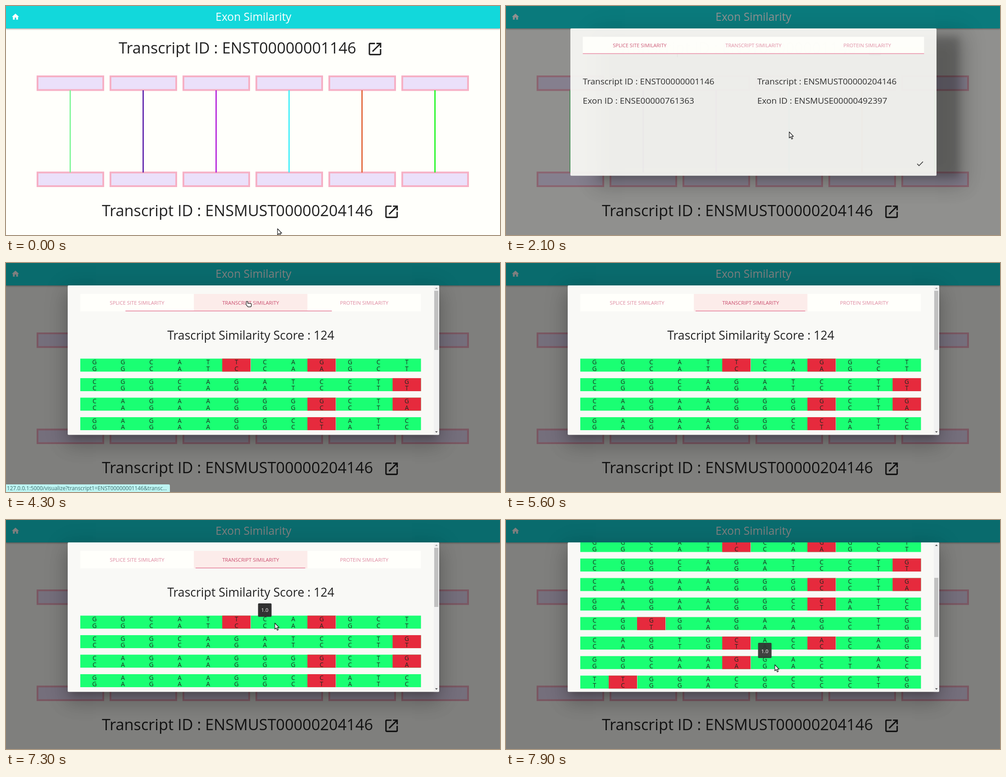
These frames come from a looping animation (1097x511 px, 8000 ms). An HTML page with a canvas:

```html
<!DOCTYPE html>
<html lang="en">
<head>
<meta charset="utf-8">
<title>Exon Similarity</title>
<style>
html, body { margin: 0; width: 100%; height: 100%; overflow: hidden; background: #fffffb; }
canvas { display: block; width: 1097px; height: 511px; }
</style>
</head>
<body>
<canvas id="stage" width="1097" height="511"></canvas>
<script>
const W = 1097, H = 511, LOOP = 8000, STEP = 100;
const ctx = document.getElementById('stage').getContext('2d');
const INK = '#212121';

const HOME = new Path2D('M10 20v-6h4v6h5v-8h3L12 3 2 12h3v8z');
const OPEN = new Path2D('M19 19H5V5h7V3H5c-1.11 0-2 .9-2 2v14c0 1.1.89 2 2 2h14c1.1 0 2-.9 2-2v-7h-2v7z' +
  'M14 3v2h3.59l-9.83 9.83 1.41 1.41L19 6.41V10h2V3h-7z');
const ARROW = new Path2D('M0 0V13.5L3.1 10.7 5.4 16 7.7 15 5.4 9.9H9.4Z');
const HAND = new Path2D('M1 .5h2q1 0 1 1v3.6h6q1.7 0 1.7 1.7v3.4q0 2.6-2.6 2.6H4.4L.4 8.4Q-.4 7 .4 6.2Z');

const LINES = ['#78f592', '#5212a6', '#b012d8', '#30eefa', '#e05828', '#10f612'];

// upper strand, then the differing bases of the lower strand by column
const ROWS = [
  ['GGCATTCAGGCT', { 5: 'C', 8: 'A' }],
  ['CGGCAGATCCTG', { 11: 'T' }],
  ['CAGAAGGGGCTG', { 8: 'C', 11: 'A' }],
  ['GAGAAGGCCATC', { 8: 'T' }],
  ['CGGGAGAAGCTG', { 2: 'T' }],
  ['CAGTGCACACAG', { 5: 'T', 8: 'C' }],
  ['GGCAAGGACTAC', { 5: 'A' }],
  ['TTGGACGCCCTG', { 1: 'C' }]
];

// time, x, y, cursor shape
const PATH = [
  [0, 603, 497, 'arrow'], [200, 603, 497, 'arrow'],
  [300, 605, 499, 'beam'], [400, 605, 499, 'beam'],
  [600, 575, 430, 'arrow'], [700, 561, 370, 'arrow'],
  [900, 597, 282, 'arrow'], [1000, 597, 282, 'arrow'],
  [1300, 629, 281, 'arrow'], [3200, 629, 281, 'arrow'],
  [3300, 626, 275, 'arrow'], [3700, 600, 190, 'arrow'],
  [4000, 537, 92, 'hand'], [4100, 533, 85, 'hand'], [4700, 533, 85, 'hand'],
  [4800, 540, 110, 'arrow'], [5000, 562, 152, 'beam'],
  [5200, 576, 172, 'beam'], [5500, 576, 172, 'beam'],
  [5600, 577, 171, 'beam'], [5800, 577, 171, 'beam'],
  [6100, 575, 212, 'arrow'], [6500, 530, 224, 'arrow'], [6700, 508, 224, 'arrow'],
  [7200, 597, 230, 'arrow'], [7400, 597, 230, 'arrow'], [7900, 597, 323, 'arrow']
];

const clamp = v => Math.max(0, Math.min(1, v));
const mix = (a, b, k) => a + (b - a) * k;
const easeOut = v => 1 - (1 - clamp(v)) ** 2;

function rect(x, y, w, h, color) {
  ctx.fillStyle = color;
  ctx.fillRect(x, y, w, h);
}

function round(x, y, w, h, r, color) {
  ctx.fillStyle = color;
  ctx.beginPath();
  ctx.roundRect(x, y, w, h, r);
  ctx.fill();
}

function text(str, x, y, size, color = INK, align = 'center') {
  ctx.font = `${size}px "Open Sans", "Noto Sans", sans-serif`;
  ctx.textAlign = align;
  ctx.fillStyle = color;
  ctx.fillText(str, x, y);
}

function icon(path, x, y, scale, color) {
  ctx.save();
  ctx.translate(x, y);
  ctx.scale(scale, scale);
  ctx.fillStyle = color;
  ctx.fill(path);
  ctx.restore();
}

// box shadow only: the casting shape stays off stage
function shadow(x, y, w, h, dy, blur, spread, alpha) {
  const away = 4000;
  ctx.save();
  ctx.shadowColor = `rgba(0,0,0,${alpha})`;
  ctx.shadowBlur = blur;
  ctx.shadowOffsetX = away;
  ctx.shadowOffsetY = dy;
  rect(x - spread - away, y - spread, w + 2 * spread, h + 2 * spread, '#000');
  ctx.restore();
}

function page() {
  rect(0, 0, W, H, '#fffffb');
  shadow(0, 0, W, 50, 2, 2, 0, 0.2);
  shadow(0, 0, W, 50, 1, 5, 0, 0.15);
  rect(0, 0, W, 50, '#12d8db');
  icon(HOME, 11.4, 14.6, 0.8, '#fff');
  text('Exon Similarity', 549.5, 33, 24.6, '#fff');
  text('Transcript ID : ENST00000001146', 514, 106, 34.25);
  icon(OPEN, 800.8, 77.4, 1.55, INK);
  text('Transcript ID : ENSMUST00000204146', 514, 469, 34.25);
  icon(OPEN, 837.6, 440.6, 1.55, INK);
  LINES.forEach((color, i) => {
    const x = 68 + 162 * i;
    for (const y of [155, 369.5]) {
      rect(x, y, 150, 34.5, '#f6b0c5');
      rect(x + 4, y + 4, 142, 26.5, '#ebe0fa');
    }
    rect(x + 73.3, 188, 2.6, 183.5, color);
  });
}

function tabs(y, width, active, left, right) {
  const names = ['SPLICE SITE', 'TRANSCRIPT', 'PROTEIN'];
  const tab = width / 3;
  rect(165, y, width, 39, '#fffffb');
  if (active) rect(165 + tab * active, y, tab, 39, '#fcecea');
  names.forEach((name, i) => {
    text(name + ' SIMILARITY', 165 + tab * (i + 0.5), y + 23.6, 11.25, i === active ? '#c94b6c' : '#de879f');
  });
  rect(left, y + 37.2, right - left, 1.8, '#e991a8');
}

function splicePanel() {
  tabs(69, 769, 0, 165, 934);
  const line = (str, x, y) => text(str, x, y, 19.25, INK, 'left');
  line('Transcript ID : ENST00000001146', 165, 177.3);
  line('Exon ID : ENSE00000761363', 165, 220);
  line('Transcript : ENSMUST00000204146', 558, 177.3);
  line('Exon ID : ENSMUSE00000492397', 558, 220);
  ctx.strokeStyle = '#333';
  ctx.lineWidth = 1.7;
  ctx.beginPath();
  ctx.moveTo(918.5, 356.5);
  ctx.lineTo(922.6, 360.8);
  ctx.lineTo(931.5, 351.8);
  ctx.stroke();
}

function bases(row, y) {
  const [upper, diff] = row, cell = 756.5 / 12;
  rect(165, y, 756.5, 29, '#1aff73');
  [...upper].forEach((base, i) => {
    const x = 165 + i * cell, mid = x + cell / 2;
    if (diff[i]) {
      rect(x, y, cell, 29, '#e62a3d');
      if (i < 11) rect(x + cell, y, 0.6, 29, '#f9f9f6');
    }
    text(base, mid, y + 12.7, 13.6, '#1d2b1f');
    text(diff[i] || base, mid, y + 27.2, 13.6, '#1d2b1f');
  });
}

function triangle(y, dir, color) {
  ctx.fillStyle = color;
  ctx.beginPath();
  ctx.moveTo(952.8, y);
  ctx.lineTo(958.8, y);
  ctx.lineTo(955.8, y + 3.2 * dir);
  ctx.fill();
}

function scorePanel(t, scroll) {
  const start = 4144;
  const right = mix(921, 664.5, easeOut((t - start) / 300));
  const left = mix(165, 421, easeOut((t - start - 90) / 300));
  tabs(69 - scroll, 756.5, 1, left, right);
  text('Trascript Similarity Score : 124', 543.5, 170.7 - scroll, 26.6);
  ROWS.forEach((row, i) => bases(row, 213.4 + 43.55 * i - scroll));
  rect(950, 50, 12, 333.5, '#f1f1f1');
  rect(951, 62 + scroll * 0.392, 9, 132, '#c1c1c1');
  triangle(58, -1, scroll ? '#505050' : '#a3a3a3');
  triangle(375.5, 1, '#505050');
}

function dialog(t, scroll) {
  const scale = t < 2200 ? 0.9855 : t < 2500 ? 0.998 : 1;
  ctx.globalAlpha = t < 2200 ? 0.93 : 1;
  ctx.save();
  ctx.translate(549.5, 50);
  ctx.scale(scale, scale);
  ctx.translate(-549.5, -50);
  const box = [137, 50, 825, 333.5];
  shadow(...box, 11, 15, -7, 0.2);
  shadow(...box, 24, 38, 3, 0.14);
  shadow(...box, 9, 46, 8, 0.12);
  round(...box, 2, '#f9f9f6');
  ctx.beginPath();
  ctx.roundRect(...box, 2);
  ctx.clip();
  if (t < 4200) splicePanel();
  else scorePanel(t, scroll);
  ctx.restore();
  ctx.globalAlpha = 1;
}

function status() {
  round(-4, 494, 368, 22, 3, '#bdf4f2');
  text('127.0.0.1:5000/visualize?transcript1=ENST00000001146&transc…', 2, 507, 11.75, '#3f6f70', 'left');
}

function tip(label, x, y, h, alpha, base) {
  ctx.globalAlpha = alpha;
  round(x - 15, y, 30, h, 2, '#323232');
  ctx.globalAlpha = 1;
  text(label, x, base, 11.2, '#fff');
}

function tooltips(t) {
  const within = (a, b) => t >= a && t < b;
  if (within(6300, 6500) || within(7100, 7600)) tip('1.0', 574.7, 186, 30, 1, 205);
  if (within(6600, 7000)) tip('0.0', 511.5, 186, 30, 1, 205);
  if (t >= 7900) tip('1.0', 574.7, 274, 34, 0.92, 297);
}

function cursor(t) {
  let i = PATH.length - 1;
  while (PATH[i][0] > t) i--;
  const a = PATH[i], b = PATH[i + 1] || a;
  const k = b === a ? 0 : (t - a[0]) / (b[0] - a[0]);
  ctx.save();
  ctx.translate(mix(a[1], b[1], k), mix(a[2], b[2], k));
  ctx.lineJoin = 'round';
  if (a[3] === 'beam') {
    const beam = new Path2D('M-3 -7H-1Q0 -7 0 -6V6Q0 7 -1 7H-3M3 -7H1Q0 -7 0 -6M0 6Q0 7 1 7H3');
    for (const [width, color] of [[3, '#fff'], [1.3, '#111']]) {
      ctx.lineWidth = width;
      ctx.strokeStyle = color;
      ctx.stroke(beam);
    }
  } else {
    const shape = a[3] === 'hand' ? HAND : ARROW;
    ctx.fillStyle = '#fff';
    ctx.strokeStyle = '#111';
    ctx.lineWidth = 1.2;
    ctx.fill(shape);
    ctx.stroke(shape);
  }
  ctx.restore();
}

function draw(t) {
  const scroll = 171 * clamp((t - 7400) / 500);
  page();
  if (t >= 2100) {
    rect(0, 0, W, H, `rgba(0,0,0,${t < 2200 ? 0.435 : 0.5})`);
    dialog(t, scroll);
  }
  if (t >= 4000 && t < 4800) status();
  tooltips(t);
  cursor(t);
}

const begin = performance.now();
let shown = -1;
function frame() {
  const t = Math.floor(((performance.now() - begin) % LOOP) / STEP) * STEP;
  if (t !== shown) draw(shown = t);
  requestAnimationFrame(frame);
}
frame();
</script>
</body>
</html>
```
